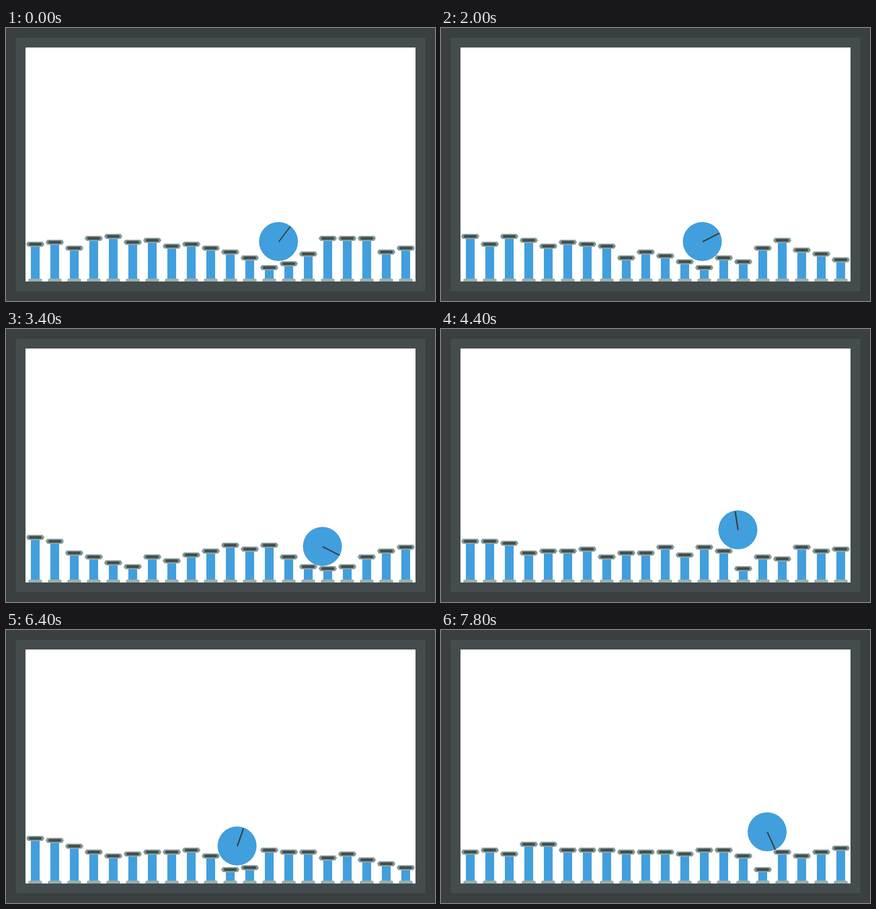
Animation of 880 by 560 pixels, one loop 8 s. Source, as an HTML page with a canvas:

```html
<!DOCTYPE html>
<html lang="en">
<head>
<meta charset="utf-8">
<title>Ball on pistons</title>
<style>
  html, body { margin: 0; width: 100%; height: 100%; overflow: hidden; background: #3a4041; }
  canvas { display: block; }
</style>
</head>
<body>
<canvas id="stage" width="880" height="560"></canvas>
<script>
const ctx = document.getElementById('stage').getContext('2d');
const LOOP = 8000, STEP = 200, PISTONS = 20, RADIUS = 40;
const BLUE = '#419fdd', DARK = '#3a4041', FRAME = '#444c4d', RIM = '#9bafac', METAL = '#7f9492';

// Ball position and turn in degrees; row: rough piston levels at every fourth piston
const keys = [
  { t: 0,    x: 559, y: 438, turn: -53,  row: [11, 14, 10, 4, 15, 5] },
  { t: 1000, x: 710, y: 436, turn: 304,  row: [12, 10, 9, 4, 2, 17] },
  { t: 2000, x: 536, y: 438, turn: -27,  row: [15, 13, 8, 0, 12, 3] },
  { t: 3400, x: 649, y: 446, turn: 27,   row: [16, 1, 8, 11, 3, 13] },
  { t: 5400, x: 569, y: 428, turn: -225, row: [12, 15, 9, 7, 12, 13] },
  { t: 6400, x: 474, y: 443, turn: -431, row: [17, 8, 10, 10, 6, 1] },
  { t: 7800, x: 669, y: 414, turn: -294, row: [9, 12, 8, 10, 7, 11] }
];

const clamp = (v, lo, hi) => Math.max(lo, Math.min(hi, v));
const mix = (a, b, u) => a + (b - a) * u;
const smooth = u => u * u * (3 - 2 * u);
const hash = n => { const v = Math.sin(n * 127.1 + 11.7) * 43758.5453; return v - Math.floor(v); };
const pistonX = i => 60 + 40 * i;

// Seeded wandering between -1 and 1
function wander(i, t) {
  const n = Math.floor(t / 500), u = t / 500 - n;
  return 2 * mix(hash(i * 50 + n), hash(i * 50 + n + 1), u) - 1;
}

function rowLevel(row, i) {
  const k = Math.floor(i / 4);
  return mix(row[k], row[k + 1], i / 4 - k);
}

// Highest level that stays clear of the ball
function clearLevel(i, ball) {
  const gap = Math.max(0, Math.abs(pistonX(i) - ball.x) - 16);
  if (gap >= RADIUS) return 16;
  const limit = ball.y + Math.sqrt(RADIUS ** 2 - gap ** 2) + 6;
  return Math.floor((494 - limit) / 4);
}

// The ball lies in a trough: the nearest piston is down, the next one carries it
function pistonLevel(i, t, from, to, u, ball) {
  const nearest = Math.round((ball.x - 60) / 40);
  const carrier = nearest + (ball.x < pistonX(nearest) ? -1 : 1);
  const clear = clearLevel(i, ball);
  if (i === nearest) return 0;
  if (i === carrier) return clamp(clear, 0, 16);
  const level = mix(rowLevel(from.row, i), rowLevel(to.row, i), u) + 3 * wander(i, t);
  return clamp(Math.min(Math.round(level), clear), 0, 16);
}

function rect(color, x, y, w, h) {
  ctx.fillStyle = color;
  ctx.fillRect(x, y, w, h);
}

function hexagon(color, x, y, half, flat, height) {
  ctx.fillStyle = color;
  ctx.beginPath();
  ctx.moveTo(x - half, y);
  ctx.lineTo(x - flat, y - height);
  ctx.lineTo(x + flat, y - height);
  ctx.lineTo(x + half, y);
  ctx.lineTo(x + flat, y + height);
  ctx.lineTo(x - flat, y + height);
  ctx.fill();
}

function drawPiston(x, y) {
  rect(BLUE, x - 9, y, 18, 515 - y);
  rect(RIM, x - 12, 514, 24, 2);
  rect(RIM, x - 14, 515, 28, 5);
  rect(RIM, x - 10, y + 5, 20, 1);
  hexagon(RIM, x, y + 0.5, 19, 15.5, 5.2);
  hexagon(METAL, x, y + 0.5, 17.5, 14.5, 4.3);
  hexagon(FRAME, x, y + 0.5, 13.5, 11.5, 2.7);
}

function drawBall({ x, y, turn }) {
  ctx.fillStyle = BLUE;
  ctx.beginPath();
  ctx.arc(x, y, RADIUS, 0, 2 * Math.PI);
  ctx.fill();
  const c = Math.cos(turn * Math.PI / 180), s = Math.sin(turn * Math.PI / 180);
  ctx.strokeStyle = DARK;
  ctx.lineWidth = 3 * Math.max(Math.abs(c), Math.abs(s));
  ctx.beginPath();
  ctx.moveTo(x + 0.5, y + 0.5);
  ctx.lineTo(x + 0.5 + 39 * c, y + 0.5 + 39 * s);
  ctx.stroke();
}

function draw(t) {
  const next = clamp(keys.findIndex(key => key.t > t), 1, keys.length - 1);
  const k = t >= LOOP - STEP ? keys.length - 1 : next;
  const from = keys[k - 1], to = keys[k];
  const u = (t - from.t) / (to.t - from.t), eased = smooth(u);
  const ball = {
    x: Math.round(mix(from.x, to.x, eased)),
    y: Math.round(mix(from.y, to.y, eased) - 25 * Math.sin(Math.PI * u)),
    turn: mix(from.turn, to.turn, eased)
  };

  rect(DARK, 0, 0, 880, 560);
  rect(FRAME, 20, 20, 840, 520);
  rect('#fff', 40, 40, 800, 480);
  for (let i = 0; i < PISTONS; i++) {
    drawPiston(pistonX(i), 491 - 4 * pistonLevel(i, t, from, to, u, ball));
  }
  drawBall(ball);
}

const start = performance.now();
function tick() {
  const t = (performance.now() - start) % LOOP;
  draw(Math.floor(t / STEP) * STEP);
  requestAnimationFrame(tick);
}
tick();
</script>
</body>
</html>
```
